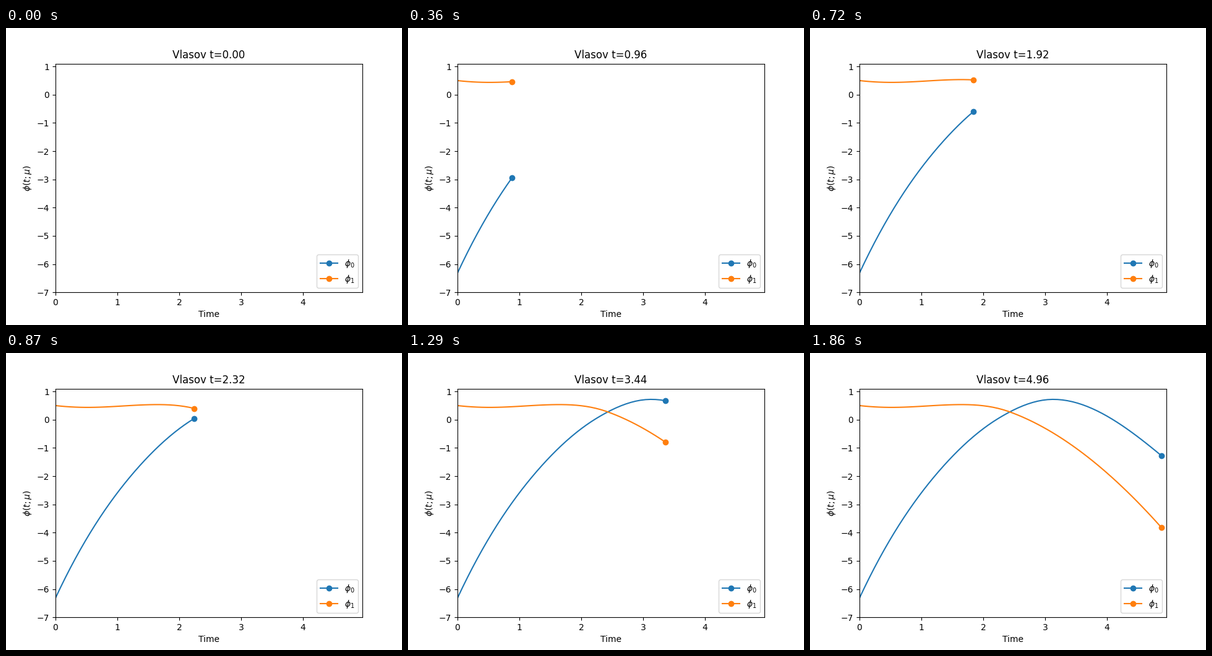
Animation, 640 px wide and 480 px high, one loop 1890 ms. Source, as a matplotlib script:

```python
import numpy as np
import matplotlib.pyplot as plt
from matplotlib.animation import FuncAnimation

FRAMES = 63
INTERVAL = 30
DT = 0.08

t = DT * np.arange(FRAMES)


def hermite(*keys):
    """Piecewise cubic through (time, value, slope) keys, sampled on t."""
    x, y, m = np.array(keys).T
    i = np.clip(np.searchsorted(x, t, side="right") - 1, 0, len(x) - 2)
    h = x[i + 1] - x[i]
    s = (t - x[i]) / h
    ease = s * s * (3 - 2 * s)
    return (y[i] + (y[i + 1] - y[i]) * ease
            + h * s * (1 - s) * (m[i] * (1 - s) - m[i + 1] * s))


phi = [
    hermite((0, -6.316, 4.7), (1.36, -1.633, 2.44), (2.24, 0.04, 1.34),
            (3.13, 0.72, 0), (4.88, -1.275, -1.82)),
    hermite((0, 0.5, -0.25), (0.52, 0.436, 0), (1.65, 0.535, 0),
            (2.43, 0.275, -0.8), (4.88, -3.82, -2.46)),
]

fig, ax = plt.subplots(figsize=(6.4, 4.8), dpi=100)
ax.set_xlim(0, t[-1])
ax.set_ylim(-7, 1.1)
ax.set_xlabel("Time")
ax.set_ylabel(r"$\phi(t;\mu)$")
title = ax.set_title("Vlasov t=0.00")
lines = [
    ax.plot([], [], "-o", markevery=slice(-1, None), label=rf"$\phi_{i}$")[0]
    for i in range(len(phi))
]
ax.legend(loc="lower right")


def update(n):
    # The curves trail the clock by one step; a dot marks their tip.
    for line, values in zip(lines, phi):
        line.set_data(t[:n], values[:n])
    title.set_text(f"Vlasov t={t[n]:.2f}")
    return [*lines, title]


anim = FuncAnimation(fig, update, frames=FRAMES, interval=INTERVAL,
                     repeat=True, repeat_delay=0)
plt.show()
```
